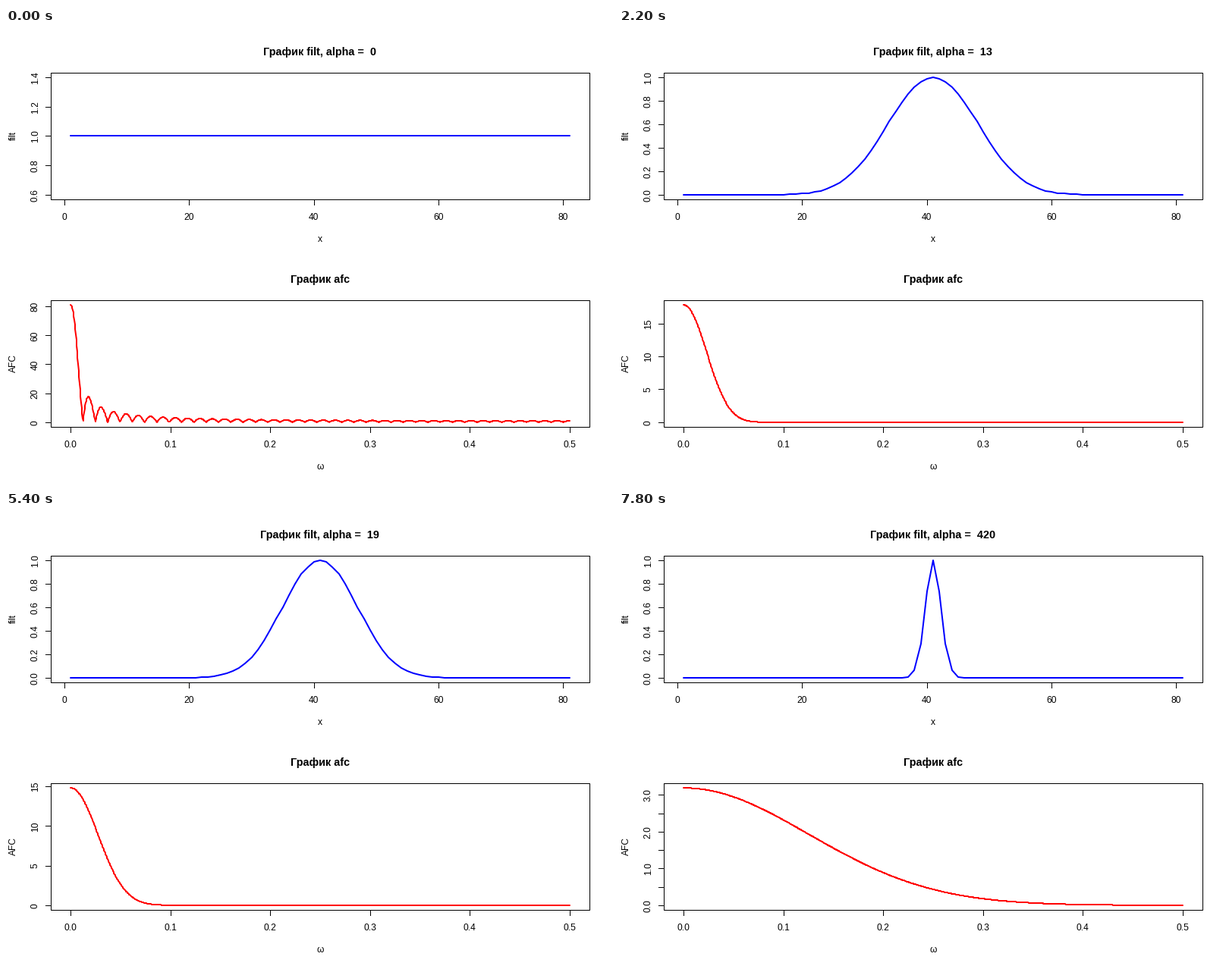
A matplotlib script that plays this animation: 800x600 px, repeating every 8000 ms.

```python
import numpy as np
import matplotlib
import matplotlib.pyplot as plt
from matplotlib.animation import FuncAnimation

matplotlib.rcParams["font.family"] = "Liberation Sans"

DPI = 100
PX = 72 / DPI                    # one pixel in points
LEFT, RIGHT, HEIGHT = 59, 769, 167
PAD = 0.04 / 1.08                # share of the panel kept free on each side
MID = 414

N = 81
K = np.arange(1, N + 1)
OMEGA = np.linspace(0, 0.5, 1001)
COSINES = np.cos(2 * np.pi * np.outer(OMEGA, K - (N + 1) / 2))

# powers run in dictionary order: small whole ones mixed with multiples of 60
POWERS = [n for n in range(23) if n != 15] + list(range(60, 1981, 60))
ALPHAS = sorted(map(str, POWERS))[:40]

fig = plt.figure(figsize=(8, 6), dpi=DPI, facecolor="white")
ax = fig.add_axes([0, 0, 1, 1])


def line(xs, ys, color="black", width=1, cap="projecting", join="miter"):
    ax.plot(xs, ys, color=color, lw=width * PX, snap=False,
            solid_capstyle=cap, solid_joinstyle=join)


def text(x, y, s, size=12, **kw):
    ax.text(x - 0.7, y, s, fontsize=size * PX, ha="center", va="baseline",
            rotation_mode="anchor", **kw)


def pretty_step(span):
    """Round tick step that cuts the span into about five parts."""
    cell = span / 5
    base = 10 ** np.floor(np.log10(cell))
    step = base
    for factor, bias in ((2, 0.8), (5, 1.7), (10, 0.8)):
        if factor * base - cell >= bias * (cell - step):
            break
        step = factor * base
    return step


def label_width(s):
    return sum(3.33 if c == "." else 6.67 for c in s)


def scale(lo, hi, start, end):
    """Map lo..hi into start..end, leaving the padding free."""
    a = start + (end - start) * PAD
    b = end - (end - start) * PAD
    return lambda v: a + (b - a) * (v - lo) / (hi - lo)


def panel(top, title, xlab, ylab, xs, ys, color, xticks):
    bottom = top + HEIGHT
    lo, hi = ys.min(), ys.max()
    if hi - lo < 1e-9:
        lo, hi = 0.6, 1.4
    to_x = scale(xs[0], xs[-1], LEFT, RIGHT)
    to_y = scale(lo, hi, bottom, top)

    # a two-pixel pen on whole pixels is centred on the pixel edge
    line(np.round(to_x(xs)) - 0.5, np.round(to_y(ys)) - 0.5, color, 2,
         cap="round", join="round")
    line([LEFT, RIGHT, RIGHT, LEFT, LEFT], [top, top, bottom, bottom, top])

    for tick in xticks:
        x = round(to_x(tick))
        line([x, x], [bottom, bottom + 7])
        text(x, bottom + 26.5, str(tick))

    margin = 0.04 * (hi - lo)
    step = pretty_step((hi - lo) + 2 * margin)
    first = int(np.ceil((lo - margin) / step - 1e-7))
    last = int(np.floor((hi + margin) / step + 1e-7))
    digits = 0 if step > 0.99 else 1
    free = 1e9
    for n in range(first, last + 1):
        y = to_y(n * step)
        line([LEFT - 7, LEFT], [round(y)] * 2)
        label = f"{n * step:.{digits}f}"
        half = label_width(label) / 2
        if y + half < free:       # skip labels that would crowd the last one
            text(42, y, label, rotation=90)
            free = y - half - 10

    text(MID, top - 23.5, title, 14.4, weight="bold")
    text(MID, bottom + 55, xlab)
    text(12.7, top + HEIGHT / 2 - 1, ylab, rotation=90)


def draw(i):
    alpha = ALPHAS[i]
    filt = np.sin(np.pi * K / (N + 1)) ** int(alpha)
    afc = np.abs(COSINES @ filt)
    ax.clear()
    ax.set(xlim=(-0.5, 799.5), ylim=(599.5, -0.5))
    ax.axis("off")
    panel(59, f"График filt, alpha =  {alpha}", "x", "filt",
          K, filt, "#0000ff", [0, 20, 40, 60, 80])
    panel(359, "График afc", "ω", "AFC",
          OMEGA, afc, "#ff0000", [0.0, 0.1, 0.2, 0.3, 0.4, 0.5])
    return []


anim = FuncAnimation(fig, draw, frames=len(ALPHAS), interval=200,
                     init_func=lambda: draw(0), repeat=True, repeat_delay=0)
plt.show()
```
